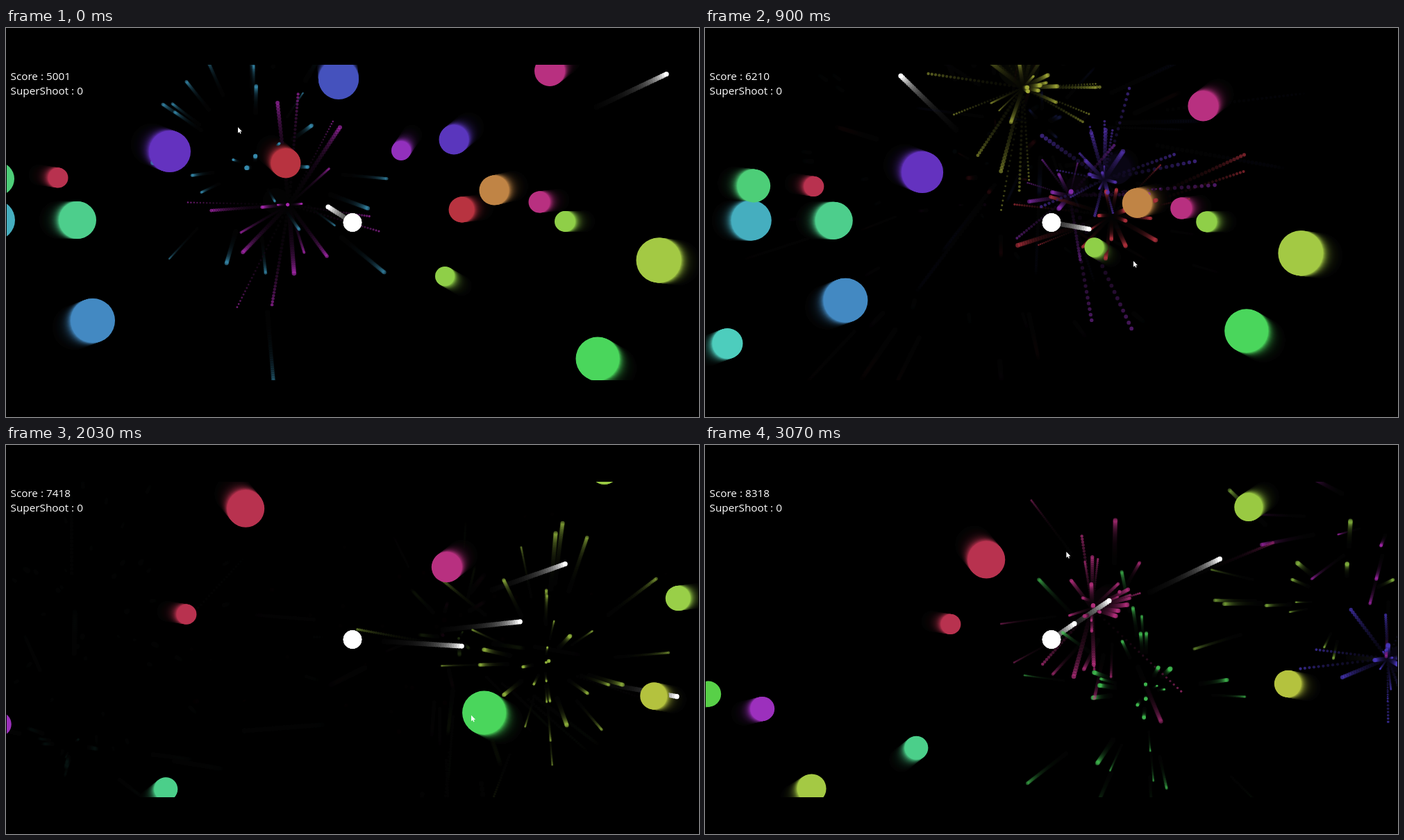
Recreate the animation shown at these times as an HTML page with a canvas. Size 998x561 px, loop 3100 ms.

```html
<!DOCTYPE html>
<html lang="en">
<head>
<meta charset="utf-8">
<title>Orb shooter</title>
<style>
html, body { margin: 0; width: 100%; height: 100%; overflow: hidden; background: #000; }
canvas { position: absolute; left: 1px; top: 53px; }
#hud {
  position: absolute; left: 6.5px; top: 59px; color: #fff; white-space: pre;
  font: 15.3px/20.6px "Open Sans", "Noto Sans", sans-serif;
}
</style>
</head>
<body>
<canvas id="stage" width="996" height="455"></canvas>
<div id="hud"><div id="score"></div><div id="supers"></div></div>
<script>
const FPS = 30, FRAMES = 93, LOOP = 3100;
const TICK = 1 / 100, HISTORY = 30, FADE = 0.135;
const PLAYER = { x: 499, y: 280.5, r: 13.2 };
const ORB_SPEED = 92, SHOT_SPEED = 370, DRAG = 1.2;

const ctx = document.getElementById('stage').getContext('2d');
const scoreLine = document.getElementById('score');
const superLine = document.getElementById('supers');
ctx.translate(-1, -53);

const orbs = [], shots = [], sparks = [];

let seed = 11;
function random() {
  seed = (seed * 16807) % 2147483647;
  return seed / 2147483647;
}

// Unit vector and distance from the player to a point.
function aim(x, y) {
  const dx = x - PLAYER.x, dy = y - PLAYER.y, d = Math.hypot(dx, dy);
  return { ux: dx / d, uy: dy / d, d };
}

// Short-lived bursts fly faster.
function burst(color, start, x, y, count, life) {
  const speed = 1700 / Math.sqrt(life);
  const push = () => (random() - 0.5) * random() * speed;
  for (let i = 0; i < count; i++) {
    sparks.push({
      color, start, x, y, life,
      vx: push(), vy: push(), r: 1.2 + 2.2 * random()
    });
  }
}

// Orbs head for the player through (x, y) at time t,
// and burst at the side facing the player when they die.
function orb(color, r, t, x, y, end = Infinity, life = 0.6) {
  const { ux, uy, d } = aim(x, y);
  const o = { color, r, ux, uy, end, reach: d + ORB_SPEED * t, hit: Infinity };
  orbs.push(o);
  if (end < Infinity) {
    const front = o.reach - ORB_SPEED * end - r;
    burst(color, end, PLAYER.x + ux * front, PLAYER.y + uy * front, r * 1.1, life);
  }
  return o;
}

// A shot leaves the player and passes (x, y) at time t.
function shot(t, x, y, end = Infinity) {
  const { ux, uy, d } = aim(x, y);
  shots.push({ ux, uy, end, start: t - d / SHOT_SPEED });
}

// On stage at the start
burst('#3f9fc6', -0.7, 358, 200, 34, 1.5);
orb('#b42cbc', 18, -0.28, 390, 250, -0.28, 1.1);
orb('#b83340', 21.5, 0, 403, 195, 0.08, 0.8);
orb('#4552bd', 29, 0, 479, 74, 0.4, 0.5);
orb('#b83340', 18.5, 0, 656, 262, 0.57, 1.2);
orb('#b4bd3e', 30, 0.3, 445, 23, 0.67);
orb('#9230bd', 14, 0, 569, 177, 0.7, 0.5);
orb('#5a36bd', 21.5, 0, 645, 161, 0.75, 0.5);
orb('#6432bf', 30, 0, 236, 178, 0.93, 0.4);
orb('#4dce8c', 27, 0, 103, 277, 1);
orb('#4389c2', 32, 0, 125, 422, 1.03);
orb('#8fcf48', 14, 0, 632, 358, 1.06);
orb('#c08445', 21.5, 0, 703, 234, 1.14);
orb('#45aebf', 29, 0, -16, 277, 1.17);
orb('#4dce78', 24, 0, -12, 217.5, 1.18);
orb('#b83080', 15.5, 0, 768, 251, 1.4, 0.55);
orb('#a3c944', 32.5, 0, 940, 335, 1.45, 1.3);
orb('#8fcf48', 15, 0, 805, 279, 1.5, 0.5);
orb('#4ad65c', 31.5, 0, 852, 477, 2.36, 1.4);
const tough = orb('#b83080', 22, 0, 783, 62, 2.85, 1.1);
orb('#b8324f', 14.5, 0, 75, 216);

// Later arrivals
orb('#4dcdbd', 22, 0.9, 32.5, 455, 1.4, 0.55);
orb('#99cf48', 18, 2.03, 968, 221, 2.33, 1.3);
orb('#b82cc0', 18, 2.45, 1006, 102, 2.45, 1.3);
orb('#4a38c0', 20, 2.89, 1003, 309, 2.89, 1);
orb('#b8324f', 27, 2.03, 345, 91.5);
orb('#b4c23e', 19.5, 2.03, 933, 362);
orb('#99c942', 20.5, 2.88, 797, 80);
orb('#9c30bd', 17.5, 2.88, 66, 384.5);
orb('#4bcf8a', 17, 2.88, 291, 447.5);
orb('#a4c944', 21, 2.88, 139, 504.5);
orb('#58d048', 18.5, 3.07, 5, 359);

// One orb survives its first hit and shrinks.
tough.hit = 2.53;
burst(tough.color, tough.hit, 588, 236, 14, 1.2);

shot(0, 951, 66.5);
shot(0, 464, 258, 0.08);
shot(0.3, 441, 224);
shot(0.9, 553, 290);
shot(2.03, 655, 290, 2.89);
shot(2.03, 739, 255, 2.33);
shot(2.03, 804, 172, 2.45);
shot(2.53, 588, 236, 2.53);
shot(2.7, 619, 223);
shot(2.7, 542, 250.5, 2.85);
shot(3.07, 583, 224);
shot(3.07, 533, 257);

const scores = [
  [0, 5001], [0.08, 5201], [0.57, 5801], [0.75, 6210], [1.03, 6411],
  [1.18, 6815], [1.5, 7418], [2.36, 7818], [2.53, 8118], [2.85, 8318]];

const pointer = [
  [0, 334, 143], [0.3, 535, 106], [0.9, 617, 336], [1.23, 680, 221],
  [2.03, 670, 391], [2.7, 673, 163], [3.07, 519, 154], [3.2, 470, 150]];
const arrow = new Path2D('M0 0V8.5L2 6.7L3.4 9.6L4.6 9L3.3 6.3L6 6.2Z');

function disc(color, x, y, r) {
  ctx.fillStyle = color;
  ctx.beginPath();
  ctx.arc(x, y, r, 0, Math.PI * 2);
  ctx.fill();
}

// A disc at distance d from the player along a unit vector.
function discAlong({ ux, uy }, d, color, r) {
  disc(color, PLAYER.x + ux * d, PLAYER.y + uy * d, r);
}

function drawWorld(t) {
  disc('#fff', PLAYER.x, PLAYER.y, PLAYER.r);
  for (const s of sparks) {
    const age = t - s.start;
    if (age < 0 || age >= s.life) continue;
    const d = (1 - Math.exp(-DRAG * age)) / DRAG;
    ctx.globalAlpha = 0.85 * (1 - age / s.life);
    disc(s.color, s.x + s.vx * d, s.y + s.vy * d, s.r);
  }
  ctx.globalAlpha = 1;
  for (const s of shots) {
    if (t >= s.start && t < s.end) {
      discAlong(s, (t - s.start) * SHOT_SPEED, '#fff', 3.6);
    }
  }
  for (const o of orbs) {
    if (t >= o.end) continue;
    const shrink = 6 * Math.min(1, Math.max(0, (t - o.hit) / 0.15));
    discAlong(o, o.reach - ORB_SPEED * t, o.color, o.r - shrink);
  }
}

function drawPointer(t) {
  const i = pointer.findIndex(p => p[0] > t);
  const [t0, x0, y0] = pointer[i - 1], [t1, x1, y1] = pointer[i];
  const p = (t - t0) / (t1 - t0);
  ctx.save();
  ctx.translate(x0 + (x1 - x0) * p, y0 + (y1 - y0) * p);
  ctx.fillStyle = '#fff';
  ctx.fill(arrow);
  ctx.restore();
}

function veil(alpha) {
  ctx.fillStyle = `rgba(0,0,0,${alpha})`;
  ctx.fillRect(0, 0, 998, 561);
}

function render(t) {
  veil(1);
  // Replay recent ticks so that everything leaves a fading trail.
  for (let k = HISTORY; k >= 0; k--) {
    veil(FADE);
    drawWorld(t - k * TICK);
  }
  drawPointer(t);
  scoreLine.textContent = 'Score : ' + scores.filter(s => s[0] <= t).pop()[1];
  superLine.textContent = 'SuperShoot : ' + (t >= 0.2 && t < 0.5 ? 1 : 0);
}

const begin = performance.now();
let shown = -1;
function loop() {
  const ms = (performance.now() - begin) % LOOP;
  const frame = Math.min(FRAMES - 1, Math.floor(ms * FPS / 1000 + 0.2));
  if (frame !== shown) {
    shown = frame;
    render(frame / FPS);
  }
  requestAnimationFrame(loop);
}
loop();
</script>
</body>
</html>
```
